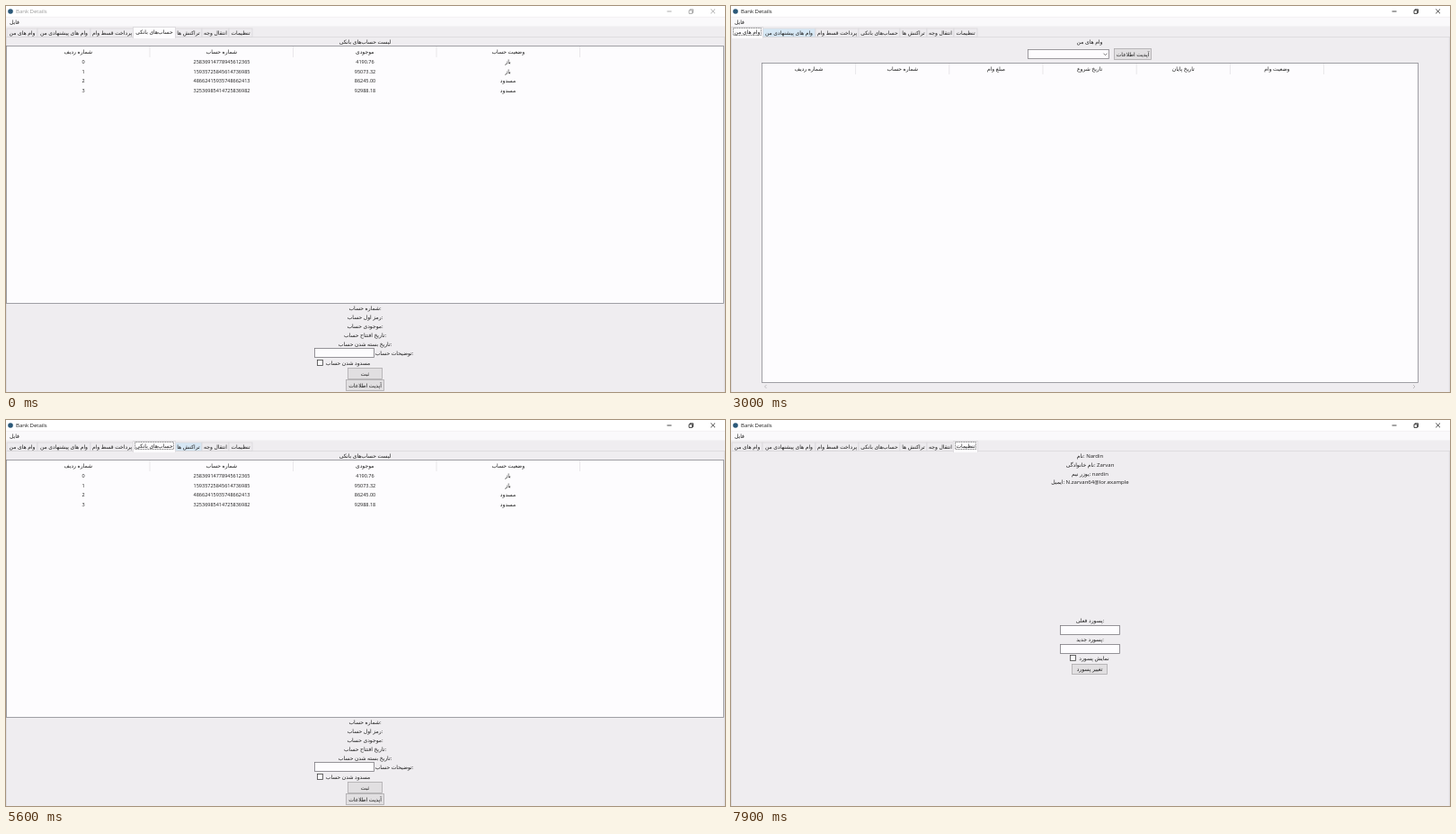
An HTML page that plays this animation: 800 px wide and 429 px high, repeating every 8 s.

```html
<!DOCTYPE html>
<html>
<head>
<meta charset="utf-8">
<title>Bank Details</title>
<style>
html, body { margin: 0; width: 100%; height: 100%; overflow: hidden; background: #efedf0; }
svg { display: block; }
text { font: 6px "Open Sans", "DejaVu Sans", sans-serif; fill: #1b1b1b; }
.mid { text-anchor: middle; }
.num { font-size: 5.5px; }
</style>
</head>
<body>
<svg id="stage" width="800" height="429" viewBox="0 0 800 429"></svg>
<script>
const PAPER = '#fdfcfe', PANEL = '#efedf0', EDGE = '#8b8b91';
const UPDATE = 'آپدیت اطلاعات';

// Boxes take left, top, right, bottom
const fill = (l, t, r, b, color) =>
  `<rect x="${l}" y="${t}" width="${r - l}" height="${b - t}" fill="${color}"/>`;
const frame = (l, t, r, b, color, stroke = EDGE, extra = '') =>
  `<rect x="${l + .5}" y="${t + .5}" width="${r - l - 1}" height="${b - t - 1}" fill="${color}" stroke="${stroke}" stroke-width=".8" ${extra}/>`;
const line = (d, color, width = .8) =>
  `<path d="${d}" fill="none" stroke="${color}" stroke-width="${width}"/>`;
const label = (s, x, y, cls = 'mid', color = '#1b1b1b') =>
  `<text x="${x}" y="${y + 2}" class="${cls}" style="fill:${color}">${s}</text>`;
const stack = (rows, x, y, step) => rows.map((s, i) => label(s, x, y + i * step)).join('');
const button = (s, l, t, r, b, enabled = true) =>
  frame(l, t, r, b, enabled ? '#e1dfe1' : '#cbc9cb', enabled ? '#adabad' : '#c0bec0') +
  label(s, (l + r) / 2, (t + b) / 2, 'mid', enabled ? '#1b1b1b' : '#8b898b');
const combo = (l, t, r, s = '') =>
  frame(l, t, r, t + 11, PAPER, '#858388') + label(s, l + 2, t + 5.5, '') +
  line(`M${r - 6.5} ${t + 4.7}l2 2 2-2`, '#555');
const entry = (l, t, r) => frame(l, t, r, t + 11, PAPER, '#7d7b80');
const checkbox = (l, t) => frame(l, t, l + 7, t + 7, PAPER, '#444');

function table(l, t, r, b, first, step, heads) {
  return frame(l, t, r, b, PAPER) + heads.map((s, i) => {
    const edge = l + first + i * step;
    return label(s, edge - step / 2, t + 6.5) +
      line(`M${edge} ${t + 1}v12`, '#e0dee1', .7);
  }).join('');
}

function scrollbar(left, right, y, thumbEnd) {
  const color = thumbEnd ? '#444' : '#b5b3b6';
  return (thumbEnd ? fill(left + 4.5, y - 4, thumbEnd, y + 4, '#cdcbcd') : '') +
    line(`M${left + 1} ${y - 2}l-2 2 2 2M${right - 1} ${y - 2}l2 2-2 2`, color);
}

const loans = () =>
  label('وام های من', 399, 40) + combo(330, 48, 421) + button(UPDATE, 426, 47, 468, 60) +
  table(34, 63, 765, 419, 104.6, 104.2,
    ['شماره ردیف', 'شماره حساب', 'مبلغ وام', 'تاریخ شروع', 'تاریخ پایان', 'وضعیت وام']) +
  scrollbar(38.5, 760, 423);

const offers = () =>
  label('وام های پیشنهادی من', 399.5, 40) + combo(330, 48, 421) + button(UPDATE, 426, 47, 468, 60) +
  table(0, 63, 799, 401, 105, 104.1,
    ['شماره ردیف', 'مبلغ دریافتی', 'مبلغ پرداختی', 'پرداختی ماهانه', 'تاریخ شروع', 'تاریخ پایان', 'نوع وام']) +
  scrollbar(4.5, 794.5, 405, 756) + button('درخواست وام', 379, 412, 419, 425);

const instalments = () =>
  label('انتخاب حساب', 22, 44) + combo(44, 38, 135) +
  label('انتخاب وام', 154.5, 44) + combo(174, 38, 264) + button(UPDATE, 754, 38, 796, 50) +
  table(0, 53, 799, 390, 115, 113.7,
    ['شماره ردیف', 'شماره قسط', 'شماره وام', 'مبلغ قابل پرداختی', 'تاریخ پرداخت', 'وضعیت پرداخت']) +
  scrollbar(4.5, 794.5, 394) +
  label('مبلغ پرداخت شده', 29, 411) + label('مبلغ باقی مانده', 78.5, 411) +
  button('پرداخت وام', 754, 404, 793, 417, false);

const accountRows = [
  ['25836914778945612365', '4190.76', 'باز'],
  ['15935725845614736985', '95073.32', 'باز'],
  ['48662415935748662413', '86245.00', 'مسدود'],
  ['32536985414725836982', '92988.18', 'مسدود']];

const accounts = () =>
  label('لیست حساب&zwnj;های بانکی', 399.5, 40) +
  table(0, 44, 799, 331, 160, 159.5, ['شماره ردیف', 'شماره حساب', 'موجودی', 'وضعیت حساب']) +
  accountRows.map(([number, balance, status], i) => {
    const y = 62.3 + i * 10.5;
    return label(i, 86, y, 'mid num') + label(number, 240, y, 'mid num') +
      label(balance, 399.5, y, 'mid num') + label(status, 558.5, y);
  }).join('') +
  stack(['شماره حساب:', 'رمز اول حساب:', 'موجودی حساب:', 'تاریخ افتتاح حساب:', 'تاریخ بسته شدن حساب:'], 399.5, 335.5, 10) +
  entry(343, 380, 410) + label('توضیحات حساب:', 432, 385.5) +
  checkbox(346, 393) + label('مسدود شدن حساب', 380.5, 396.5) +
  button('ثبت', 380, 402, 419, 415) + button(UPDATE, 378, 415, 421, 428);

const transactions = () =>
  stack(['نوع فیلتر:', 'انتخاب حساب:', 'تاریخ شروع:', 'تاریخ پایان:'], 22, 44, 16.4) +
  combo(62, 38, 121, 'تاریخ') + button('اعمال', 142, 38, 181, 50) + button(UPDATE, 187, 38, 229, 50) +
  combo(46, 55, 137) + combo(66, 71, 116, '2/4/24') + combo(66, 88, 116, '2/4/24') +
  label('لیست تراکنش&zwnj;ها', 399.5, 106) +
  table(0, 111, 800, 402, 105, 104.1,
    ['شماره ردیف', 'واریز / برداشت', 'شماره حساب مبدا', 'شماره حساب مقصد', 'مقدار انتقال',
      'تاریخ تراکنش', 'وضعیت تراکنش', 'توضیحات تراکنش']) +
  scrollbar(4.5, 785, 423, 601) +
  line('M792 407l2-2 2 2M792 422l2 2 2-2', '#b5b3b6');

const transfer = () => '';

const settings = () =>
  stack(['نام: Nardin', 'نام خانوادگی: Zarvan', 'یوزر نیم: nardin', 'ایمیل: N.zarvan64@lor.example'], 399.5, 39.7, 9.9) +
  label('پسورد فعلی:', 399.5, 223) + entry(366, 228, 433) +
  label('پسورد جدید:', 399.5, 244) + entry(366, 249, 433) +
  checkbox(377, 261) + label('نمایش پسورد', 404, 265) +
  button('تغییر پسورد', 379, 271, 419, 283);

const tabs = [
  ['وام های من', 35, loans], ['وام های پیشنهادی من', 94, offers], ['پرداخت قسط وام', 142, instalments],
  ['حساب&zwnj;های بانکی', 188, accounts], ['تراکنش ها', 218, transactions], ['انتقال وجه', 248, transfer],
  ['تنظیمات', 274, settings]];

function tabStrip(active, hover, focused) {
  let left = 1, chosen = '';
  const rest = tabs.map(([name, right], i) => {
    const mid = (left + right) / 2;
    let out = '';
    if (i === active) {
      chosen = frame(left - 1, 23, right + 1, 36, PAPER, '#dad8db') + fill(left, 34.5, right, 36, PAPER) +
        (focused ? frame(left + 1, 24, right - 1, 33, 'none', '#666', 'stroke-dasharray="1 .6"') : '') +
        label(name, mid, 28.5);
    } else {
      out = frame(left - .5, 24.5, right + .5, 35, i === hover ? '#d6e7f4' : '#edebee', '#dad8db') +
        label(name, mid, 29.7);
    }
    left = right;
    return out;
  }).join('');
  return rest + line('M0 34.5H800', '#dad8db') + chosen;
}

function chrome(focused) {
  const ink = focused ? '#1b1b1b' : '#999';
  return fill(0, 0, 800, 429, PANEL) + fill(0, 0, 800, 12, '#fff') + fill(0, 12, 800, 22.5, '#faf9fb') +
    line('M0 12.3H800', '#eceaed', .6) + '<circle cx="5" cy="6" r="2.8" fill="#2b5878"/>' +
    label('Bank Details', 11, 6, '', ink) + label('فایل', 9.5, 17.5) +
    line('M735.5 6h5M760 4.8h3.6v3.6h-3.6zM761 4.8v-1h3.6v3.6h-1M784.2 3.5l4.8 4.8M789 3.5l-4.8 4.8', ink) +
    line('M.4 35V429M799.4 35V429', '#dad8db');
}

// Start time, open tab, hovered tab
const steps = [
  [0, 3], [1400, 3, 0], [1700, 0], [2500, 0, 1], [3100, 1], [3500, 1, 2], [4200, 2], [5100, 2, 3],
  [5300, 3], [5500, 3, 4], [5800, 4], [6500, 4, 5], [7000, 5], [7300, 5, 6], [7700, 6]];

const stage = document.getElementById('stage');
let shown;
function draw(now) {
  const t = now % 8000;
  const step = steps.findLast(s => s[0] <= t) || steps[0];
  if (step !== shown) {
    const [start, active, hover] = shown = step;
    const focused = start >= 1700;
    stage.innerHTML = chrome(focused) + tabStrip(active, hover, focused) + tabs[active][2]();
  }
  requestAnimationFrame(() => draw(performance.now()));
}
draw(0);
</script>
</body>
</html>
```
